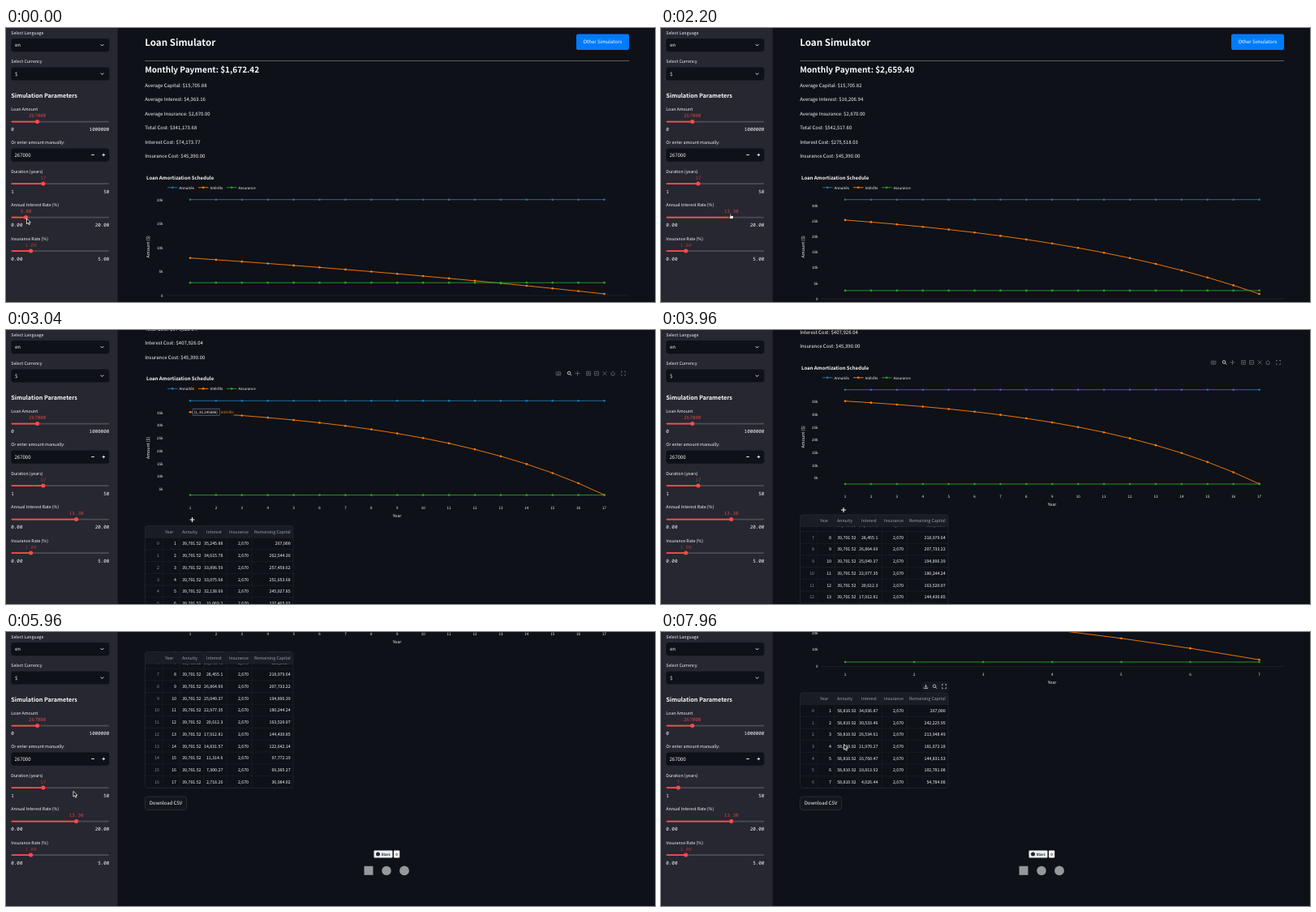
Recreate the animation shown at these times as an HTML page with a canvas. Size 800x338 px, loop 8000 ms.

```html
<!DOCTYPE html>
<html lang="en">
<head>
<meta charset="utf-8">
<title>Loan Simulator</title>
<style>
html, body { margin: 0; width: 100%; height: 100%; overflow: hidden; background: #0e1117; }
canvas { display: block; width: 800px; height: 338px; }
</style>
</head>
<body>
<canvas id="stage"></canvas>
<script>
const LOOP = 8000, W = 800, H = 338;
const RED = '#ff4b4b', DARK = '#0e1117', LIGHT = '#fafafa', GREY = '#8b8d94';
const BLUE = '#1f77b4', ORANGE = '#ff7f0e', GREEN = '#2ca02c';
const SANS = '"Noto Sans CJK JP", "Noto Sans CJK SC", "Noto Sans CJK", sans-serif';
const MONO = '"Noto Sans Mono", monospace';
const canvas = document.getElementById('stage'), c = canvas.getContext('2d');
const dpr = window.devicePixelRatio || 1;
canvas.width = W * dpr;
canvas.height = H * dpr;

// Timelines: [time, values...], eased between neighbours
const RATE = [[120, 3], [800, 5.6], [1560, 9.6], [1760, 9.6], [2160, 13.3]];
const YEARS = [[6360, 17], [6900, 7]];
const SCROLL = [[2620, 0], [2980, 124.4], [3120, 124.4], [3300, 138], [4240, 138], [4600, 341.4]];
const ROWS = [[3440, 0], [3760, 1]];
const POINTER = [[0, 25.5, 235], [120, 24, 233], [800, 40, 233], [1560, 64, 233], [1760, 64, 233],
  [2160, 86.5, 232], [2300, 86.5, 232], [2600, 229.5, 234], [3100, 229.5, 234], [3360, 229, 290],
  [3800, 229, 290], [3960, 225, 222], [4320, 225, 222], [4600, 193, 210], [5160, 193, 210],
  [5400, 120, 160], [5680, 120, 160], [5960, 83, 196.5], [6160, 83, 196.5], [6360, 45.5, 192],
  [6900, 20.8, 192], [7240, 20.8, 192], [7880, 225.5, 138.5]];
// Computed results lag behind the sliders: [time, rate, years]
const RESULTS = [[0, 3, 17], [520, 4.2, 17], [1000, 5.6, 17], [1480, 7.8, 17],
  [1840, 9.6, 17], [2440, 13.3, 17], [7240, 13.3, 7]];

function at(t, keys) {
  if (t <= keys[0][0]) return keys[0].slice(1);
  const i = keys.findIndex(k => k[0] > t);
  if (i < 0) return keys[keys.length - 1].slice(1);
  const a = keys[i - 1], b = keys[i], u = (t - a[0]) / (b[0] - a[0]), e = u * u * (3 - 2 * u);
  return a.slice(1).map((v, j) => v + (b[j + 1] - v) * e);
}

const num = (v, min = 0) =>
  v.toLocaleString('en-US', { minimumFractionDigits: min, maximumFractionDigits: 2 });
const money = v => '$' + num(v, 2);

function loan(rate, years) {
  const amount = 267000, r = rate / 1200, n = years * 12, insurance = 2670;
  const exact = amount * r / (1 - (1 + r) ** -n), pay = Math.round(exact * 100) / 100;
  const rows = [];
  let left = amount;
  for (let y = 1; y <= years; y++) {
    const start = left;
    let interest = 0;
    for (let m = 0; m < 12; m++) {
      interest += left * r;
      left -= pay - left * r;
    }
    rows.push({ year: y, annuity: pay * 12, interest, insurance, start });
  }
  const cost = exact * n - amount;
  const lines = [
    'Average Capital: ' + money((amount - left) / years),
    'Average Interest: ' + money(cost / years),
    'Average Insurance: ' + money(insurance),
    'Total Cost: ' + money(pay * n),
    'Interest Cost: ' + money(cost),
    'Insurance Cost: ' + money(insurance * years)];
  return { pay, rows, lines };
}

// Drawing helpers; y is the middle of the capitals
function text(s, x, y, { size = 6.72, color = LIGHT, align = 'left', bold, mono } = {}) {
  c.font = `${bold ? 700 : 400} ${mono ? size : size * 0.895}px ${mono ? MONO : SANS}`;
  c.fillStyle = color;
  c.textAlign = align;
  c.fillText(s, x, y + size * 0.33);
}
function box(x, y, w, h, r, fill, stroke) {
  c.beginPath();
  c.roundRect(x, y, w, h, r);
  if (fill) { c.fillStyle = fill; c.fill(); }
  if (stroke) { c.strokeStyle = stroke; c.lineWidth = 0.6; c.stroke(); }
}
function dot(x, y, r, color) {
  c.beginPath();
  c.arc(x, y, r, 0, 7);
  c.fillStyle = color;
  c.fill();
}
function line(points, color, width = 0.8) {
  c.beginPath();
  points.forEach(p => c.lineTo(...p));
  c.strokeStyle = color;
  c.lineWidth = width;
  c.stroke();
}
function glyph(d, x, y, color, width = 0.8) {
  c.save();
  c.translate(x, y);
  c.strokeStyle = color;
  c.lineWidth = width;
  c.stroke(new Path2D(d));
  c.restore();
}

const ICON = {
  lens: 'M1.3 -.5A1.8 1.8 0 1 1 -2.3 -.5A1.8 1.8 0 1 1 1.3 -.5M.8 .8L2.6 2.6',
  full: 'M-2.5 -1V-2.5H-1M1 -2.5H2.5V-1M2.5 1V2.5H1M-1 2.5H-2.5V1',
  save: 'M0 -2.5V1M-1.5 -.5L0 1L1.5 -.5M-2.3 1.2V2.4H2.3V1.2',
  move: 'M-3 0H3M0 -3V3',
  camera: 'M-2.8 -1.5H-1.2L-.7 -2.3H.7L1.2 -1.5H2.8V2.2H-2.8ZM1 .3A1 1 0 1 1 -1 .3A1 1 0 1 1 1 .3',
  plus: 'M-2.4 -2.4H2.4V2.4H-2.4ZM-1.4 0H1.4M0 -1.4V1.4',
  minus: 'M-2.4 -2.4H2.4V2.4H-2.4ZM-1.4 0H1.4',
  auto: 'M-2.5 -2.5L2.5 2.5M2.5 -2.5L-2.5 2.5',
  home: 'M-2.8 .2L0 -2.4L2.8 .2M-1.8 0V2.3H1.8V0'
};

function drawChart(rows, hover, tip) {
  const all = rows.flatMap(r => [r.annuity, r.interest, r.insurance]);
  const lo = Math.min(...all), hi = Math.max(...all);
  const X = year => 227 + 510.5 * (year - 1) / (rows.length - 1);
  const Y = v => 328 - 116.3 * (v - lo) / (hi - lo);
  const small = { size: 5.04 };

  text('Loan Amortization Schedule', 173, 184.4, { bold: true });
  [['Annuités', BLUE, 199], ['Intérêts', ORANGE, 237], ['Assurance', GREEN, 272]].forEach(([s, col, x]) => {
    line([[x, 196.8], [x + 12.5, 196.8]], col, 0.9);
    dot(x + 6.2, 196.8, 1.3, col);
    text(s, x + 14.4, 196.9, small);
  });

  const step = hi < 45000 ? 5000 : 10000;
  for (let v = 0; v <= hi; v += step) {
    if (Y(v) > 335.5) continue;
    if (!v) line([[197, Y(0)], [768, Y(0)]], '#23262e', 0.7);
    text(v ? v / 1000 + 'k' : '0', 193.5, Y(v), { size: 5.04, align: 'right' });
  }
  rows.forEach(r => text(r.year, X(r.year), 343.5, { size: 5.04, align: 'center' }));
  text('Year', 482, 353.4, { size: 5.88, align: 'center' });
  c.save();
  c.translate(175.5, 269.8);
  c.rotate(-Math.PI / 2);
  text('Amount ($)', 0, 0, { size: 5.88, align: 'center' });
  c.restore();

  [['annuity', BLUE], ['interest', ORANGE], ['insurance', GREEN]].forEach(([key, col]) => {
    const pts = rows.map(r => [X(r.year), Y(r[key])]);
    line(pts, col, 0.9);
    pts.forEach(p => dot(...p, 1.3, col));
  });

  if (hover) {
    const names = ['camera', 'lens', 'move', 'plus', 'minus', 'auto', 'home', 'full'];
    [681, 694.5, 704.5, 718, 728, 738, 748, 761].forEach((x, i) =>
      glyph(ICON[names[i]], x, 178, i === 1 ? '#c4c6ca' : '#686a71', i === 1 ? 1 : 0.8));
  }
  if (tip) {
    const y = Y(rows[0].interest);
    box(230, y - 4, 33.5, 8, 0.5, DARK, '#8b8d94');
    text(`(1, ${(rows[0].interest / 1000).toFixed(5)}k)`, 231.8, y, small);
    box(263.8, y - 4, 17, 8, 0, DARK);
    text('Intérêts', 264.5, y, { size: 5.04, color: ORANGE });
  }
}

function drawTable(rows, top, height, inner, hover) {
  const row = 14.7, cols = [193, 214, 244, 272, 303], edge = '#23262e';
  const size = 5.88;
  c.save();
  c.beginPath();
  c.roundRect(171.5, top, 182.5, height, 3);
  c.clip();
  rows.forEach((r, i) => {
    const y = top + row * (i + 1.5) - inner;
    const cells = [r.year, r.annuity, r.interest, r.insurance, r.start];
    text(i, 189, y, { size, color: GREY, align: 'right' });
    cells.forEach((v, j) => text(num(v), [210, 240.5, 267.3, 299, 350.7][j], y, { size, align: 'right' }));
    line([[171, y + row / 2], [354, y + row / 2]], edge, 0.5);
  });
  c.fillStyle = '#1a1c24';
  c.fillRect(171, top, 184, row);
  ['Year', 'Annuity', 'Interest', 'Insurance', 'Remaining Capital'].forEach((s, i) =>
    text(s, cols[i] + 3, top + row / 2 + 0.1, { size, color: '#a0a2a8' }));
  cols.forEach(x => line([[x, top], [x, top + height]], edge, 0.5));
  line([[171, top + row], [354, top + row]], edge, 0.5);
  c.restore();
  box(171.5, top, 182.5, height, 3, null, '#2b2e36');
  if (hover) {
    box(321, top - 14, 33.5, 12.5, 3, '#15181f');
    glyph(ICON.save, 326.5, top - 7.7, '#d0d1d4');
    glyph(ICON.lens, 337.5, top - 7.7, '#d0d1d4');
    glyph(ICON.full, 349, top - 7.7, '#d0d1d4', 0.7);
  }
}

function drawFooter(y, hover) {
  box(171.3, y, 51.4, 16.4, 3.4, '#13161d', hover ? RED : '#3c3f46');
  text('Download CSV', 197, y + 8.2, { align: 'center', color: hover ? RED : LIGHT });
  const b = y + 66.4;
  box(453.5, b, 23, 9, 1, '#ebf0f4');
  dot(458.5, b + 4.5, 2.5, '#24292f');
  text('Stars', 462.5, b + 4.6, { size: 5, bold: true, color: '#24292f' });
  box(478, b, 7.2, 9, 1, '#fff');
  text('0', 481.6, b + 4.6, { size: 5, bold: true, color: '#24292f', align: 'center' });
  c.fillStyle = '#96989b';
  c.fillRect(441.5, b + 19.4, 11, 11);
  dot(469, b + 25, 5.7, '#96989b');
  dot(491, b + 25, 5.9, '#96989b');
}

function slider(y, title, value, part, min, max, alpha) {
  const x = 6.5 + 120.5 * part, label = { size: 5.88, mono: true };
  text(title, 6.3, y - 15.3, { size: 5.88 });
  c.globalAlpha = alpha;
  text(value, x, y - 7, { ...label, color: RED, align: 'center' });
  c.globalAlpha = 1;
  box(6.5, y - 0.8, 120.5, 1.7, 0.8, '#4b4c55');
  box(6.5, y - 0.8, x - 6.5, 1.7, 0.8, RED);
  dot(x, y, 2.5, RED);
  text(min, 6.3, y + 9.7, label);
  text(max, 127.3, y + 9.7, { ...label, align: 'right' });
}

function drawSidebar(rate, years) {
  c.fillStyle = '#262730';
  c.fillRect(0, 0, 137.6, H);
  [['Select Language', 'en', 6], ['Select Currency', '$', 41.4]].forEach(([title, value, y]) => {
    text(title, 6.3, y, { size: 5.88 });
    box(6.3, y + 7, 121, 16.2, 3.4, DARK);
    text(value, 11, y + 15.2);
    glyph('M-1.8 -.9L0 .9L1.8 -.9', 118.5, y + 15.1, LIGHT, 0.9);
  });
  text('Simulation Parameters', 6.3, 83.4, { size: 8.1, bold: true });
  slider(115.5, 'Loan Amount', '267000', 0.267, '0', '1000000', 0.8);
  text('Or enter amount manually:', 6.3, 141.5, { size: 5.88 });
  box(6.3, 148.5, 121, 16.2, 3.4, DARK);
  text('267000', 10.5, 156.6);
  glyph('M-1.8 0H1.8', 107, 156.5, LIGHT, 0.9);
  glyph('M-1.8 0H1.8M0 -1.8V1.8', 120.3, 156.5, LIGHT, 0.9);
  slider(192, 'Duration (years)', String(years), (years - 1) / 49, '1', '50', 0.65);
  slider(233.5, 'Annual Interest Rate (%)', rate.toFixed(2), rate / 20, '0.00', '20.00', 0.8);
  slider(275, 'Insurance Rate (%)', '1.00', 0.2, '0.00', '5.00', 0.5);
}

const ARROW = new Path2D('M0 0V6.6L1.6 5.2L2.7 7.7L3.9 7.2L2.8 4.8H4.9Z');
const HAND = new Path2D('M-1.6 -3.2Q-.9 -4 -.3 -3.2V-.8L2.4 -.3Q3.2 0 3 1L2.3 3.6H-1.2L-3.1 .9Q-2.9 0 -1.6 .8Z');
function drawPointer(x, y, kind) {
  c.save();
  c.translate(x, y);
  c.lineWidth = 0.8;
  if (kind === 'cross') {
    glyph(ICON.move, 0, 0, '#000', 2.2);
    glyph(ICON.move, 0, 0, '#fff', 1.1);
  } else {
    const shape = kind === 'hand' ? HAND : ARROW;
    c.fillStyle = kind === 'hand' ? '#fff' : '#000';
    c.strokeStyle = kind === 'hand' ? '#000' : '#fff';
    c.fill(shape);
    c.stroke(shape);
  }
  c.restore();
}

function draw(t) {
  const rate = Math.round(at(t, RATE)[0] * 10) / 10, years = Math.round(at(t, YEARS)[0]);
  const [, doneRate, doneYears] = RESULTS.filter(k => k[0] <= t).pop();
  const { pay, rows, lines } = loan(doneRate, doneYears);

  const top = 365.9, height = Math.min(168, 14.7 * (rows.length + 1));
  const scroll = Math.min(at(t, SCROLL)[0], height + 173.4);
  const inner = height < 168 ? 0 : at(t, ROWS)[0] * 97;
  const [px, py] = at(t, POINTER), pageY = py + scroll, foot = top + height + 10.5;
  const over = (x0, x1, y0, y1) => px > x0 && px < x1 && pageY > y0 && pageY < y1;
  const onChart = over(171, 768, 172, 362), onPlot = onChart && px > 215;
  const onTable = over(171, 354, top, top + height), onButton = over(171, 223, foot, foot + 16.4);

  c.setTransform(dpr, 0, 0, dpr, 0, 0);
  c.textRendering = 'geometricPrecision';
  c.fillStyle = DARK;
  c.fillRect(0, 0, W, H);

  c.save();
  c.translate(0, -scroll);
  text('Loan Simulator', 171.2, 17.6, { size: 12.95, bold: true });
  box(703, 7.6, 65, 19.4, 2, '#007bff');
  text('Other Simulators', 735.4, 17.2, { align: 'center', color: '#fff' });
  c.fillStyle = '#66686d';
  c.fillRect(171.2, 40.1, 596.8, 0.9);
  text('Monthly Payment: ' + money(pay), 171.2, 51.4, { size: 11.24, bold: true });
  lines.forEach((s, i) => text(s, 171.2, 70.8 + 17.45 * i));
  drawChart(rows, onChart, onPlot && t < 3120);
  drawTable(rows, top, height, inner, onTable);
  drawFooter(foot, onButton);
  c.restore();

  drawSidebar(rate, years);
  const dragging = (t >= 120 && t < 2300) || (t >= 6320 && t < 7300);
  drawPointer(px, py, dragging || onButton ? 'hand' : onPlot ? 'cross' : 'arrow');
}

const begin = performance.now();
function tick() {
  draw((performance.now() - begin) % LOOP);
  requestAnimationFrame(tick);
}
tick();
</script>
</body>
</html>
```
